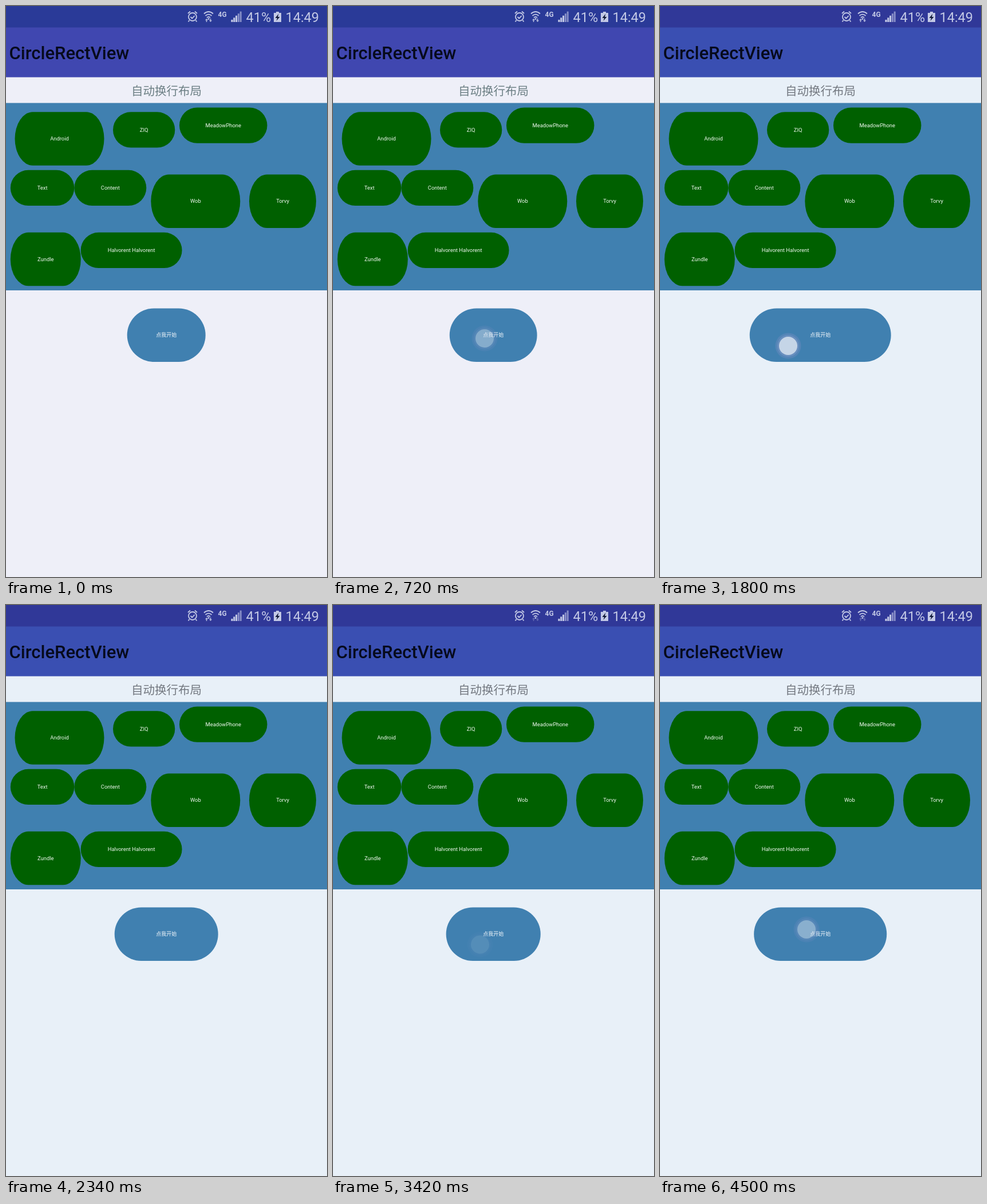
An HTML page that plays this animation: 561x998 px, repeating every 4.68 s.

```html
<!DOCTYPE html>
<html lang="zh">
<head>
<meta charset="utf-8">
<title>CircleRectView</title>
<style>
  html, body { margin: 0; width: 100%; height: 100%; overflow: hidden; }
  svg { display: block; width: 100%; height: 100%; }
  text { font-family: Roboto, "Noto Sans CJK SC", sans-serif; }
  .cjk { font-family: "Noto Sans CJK SC", "Noto Sans CJK", sans-serif; }
  .mid { text-anchor: middle; }
</style>
</head>
<body>
<svg viewBox="0 0 561 998">
  <rect id="page" width="561" height="998"/>
  <rect id="header" y="37" width="561" height="87.5"/>
  <rect id="status" width="561" height="37.5"/>

  <g fill="#c3c9e6">
    <g fill="none" stroke="#c3c9e6" stroke-width="1.8">
      <circle cx="326" cy="19" r="7"/>
      <path d="M318 13l4-3.5M334 13l-4-3.5M320.500 25l-2 2.500M331.500 25l2 2.500M322.500 19l2.700 2.700 4.500-4.700"/>
      <path d="M346 13.500q8-7 16 0M348.500 17q5.500-4.800 11 0M351 20.300q3-2.600 6 0"/>
    </g>
    <circle cx="354" cy="22.500" r="1.500"/>
    <path id="arrows" d="M348 25h5l-2.500-3zM349.700 25h1.600v3h-1.600zM355 25h5l-2.500 3zM356.700 22h1.600v3h-1.600z"/>
    <text x="370.500" y="19" font-size="12" font-weight="700">4G</text>
    <g id="signal"></g>
    <text x="419.500" y="27.500" font-size="23.500">41%</text>
    <path d="M472 10h5v2h4v16h-13v-16h4z"/>
    <path d="M476.500 13.500l-6 7.500h3.500l-1.500 5 6-7h-3.500z" fill="#101838"/>
    <text x="488.500" y="27.500" font-size="23.500">14:49</text>
  </g>

  <text x="5.500" y="93" font-size="31" font-weight="500" fill="#060a1c">CircleRectView</text>
  <text class="cjk mid" id="heading" x="280.500" y="155.500" font-size="20.500">自动换行布局</text>

  <rect y="169.500" width="561" height="327.500" fill="#4080b0"/>
  <g id="tags"></g>

  <rect id="button" y="528.500" height="93.500" rx="46.750" fill="#4080b0"/>
  <text class="cjk mid" x="280.200" y="578.400" font-size="9" fill="#f4f8fc">点我开始</text>
  <g id="touch">
    <circle r="22.500" fill="#8890c8" opacity=".28"/>
    <circle r="19" fill="#9aa6d2" opacity=".3"/>
    <circle r="16" fill="#dfe9f2" opacity=".78"/>
  </g>
</svg>
<script>
const LOOP = 4680, STEP = 180;
const GROW = 900, HOLD = 500, FADE = 270;
const MIN_W = 137, MAX_W = 247, CENTER = 280.2;

const $ = id => document.getElementById(id);

function add(parent, name, attrs, text) {
  const el = document.createElementNS("http://www.w3.org/2000/svg", name);
  set(el, attrs);
  if (text) el.textContent = text;
  parent.appendChild(el);
}

function set(el, attrs) {
  for (const key in attrs) el.setAttribute(key, attrs[key]);
}

// label, x, y, width, height
const tags = [
  ["Android", 15.5, 185.3, 156, 93.5],
  ["ZIQ", 187, 185.3, 108.3, 62.3],
  ["MeadowPhone", 303, 177.5, 153.5, 62.3],
  ["Text", 7.8, 286.8, 111.5, 62.3],
  ["Content", 119.3, 286.8, 126, 62.3],
  ["Wob", 253.3, 294.5, 156, 93.5],
  ["Torvy", 425, 294.5, 117, 93.5],
  ["Zundle", 7.8, 395.8, 123, 93.5],
  ["Halvorent Halvorent", 130.6, 395.8, 177, 62.3]
];
for (const [label, x, y, width, height] of tags) {
  add($("tags"), "rect", { x, y, width, height, rx: 31.2, ry: height / 2, fill: "#006000" });
  add($("tags"), "text", {
    x: x + width / 2, y: y + height / 2 + 3.2,
    class: "mid", "font-size": 9.4, fill: "#f0f8f0"
  }, label);
}

for (let i = 0; i < 5; i++) {
  const height = 4 + i * 3.6;
  add($("signal"), "rect", {
    x: 393.5 + i * 3.8, y: 28 - height, width: 3, height, opacity: i < 3 ? 1 : 0.6
  });
}

// Each tap is released at `at`, then the button starts to resize.
const taps = [
  { at: 590, x: 265, y: 581, open: true },
  { at: 1800, x: 224, y: 594, open: false },
  { at: 3190, x: 257, y: 593.5, open: true },
  { at: 4378, x: 256, y: 567, open: false }
];

const clamp = v => Math.min(1, Math.max(0, v));

function buttonWidth(t) {
  const last = taps.filter(tap => tap.at <= t).pop();
  if (!last) return MIN_W;
  const p = clamp((t - last.at) / GROW);
  return MIN_W + (MAX_W - MIN_W) * (last.open ? p : 1 - p);
}

function render(time) {
  const t = Math.floor((time % LOOP) / STEP) * STEP;

  const late = t >= 1440;
  set($("page"), { fill: late ? "#e8f0f8" : "#eeeff8" });
  set($("header"), { fill: late ? "#3a4fb2" : "#4047b0" });
  set($("status"), { fill: late ? "#303898" : "#2a3a98" });
  set($("heading"), { fill: late ? "#737880" : "#6c7f84" });
  set($("arrows"), { opacity: t < 3060 ? 0.9 : 0.35 });

  const width = buttonWidth(t);
  set($("button"), { x: CENTER - width / 2, width });

  const tap = taps.find(p => t >= p.at - HOLD && t < p.at + FADE);
  set($("touch"), tap
    ? { transform: `translate(${tap.x} ${tap.y})`, opacity: 1 - clamp((t - tap.at) / FADE) }
    : { opacity: 0 });
}

function tick() {
  render(performance.now());
  requestAnimationFrame(tick);
}
tick();
</script>
</body>
</html>
```
